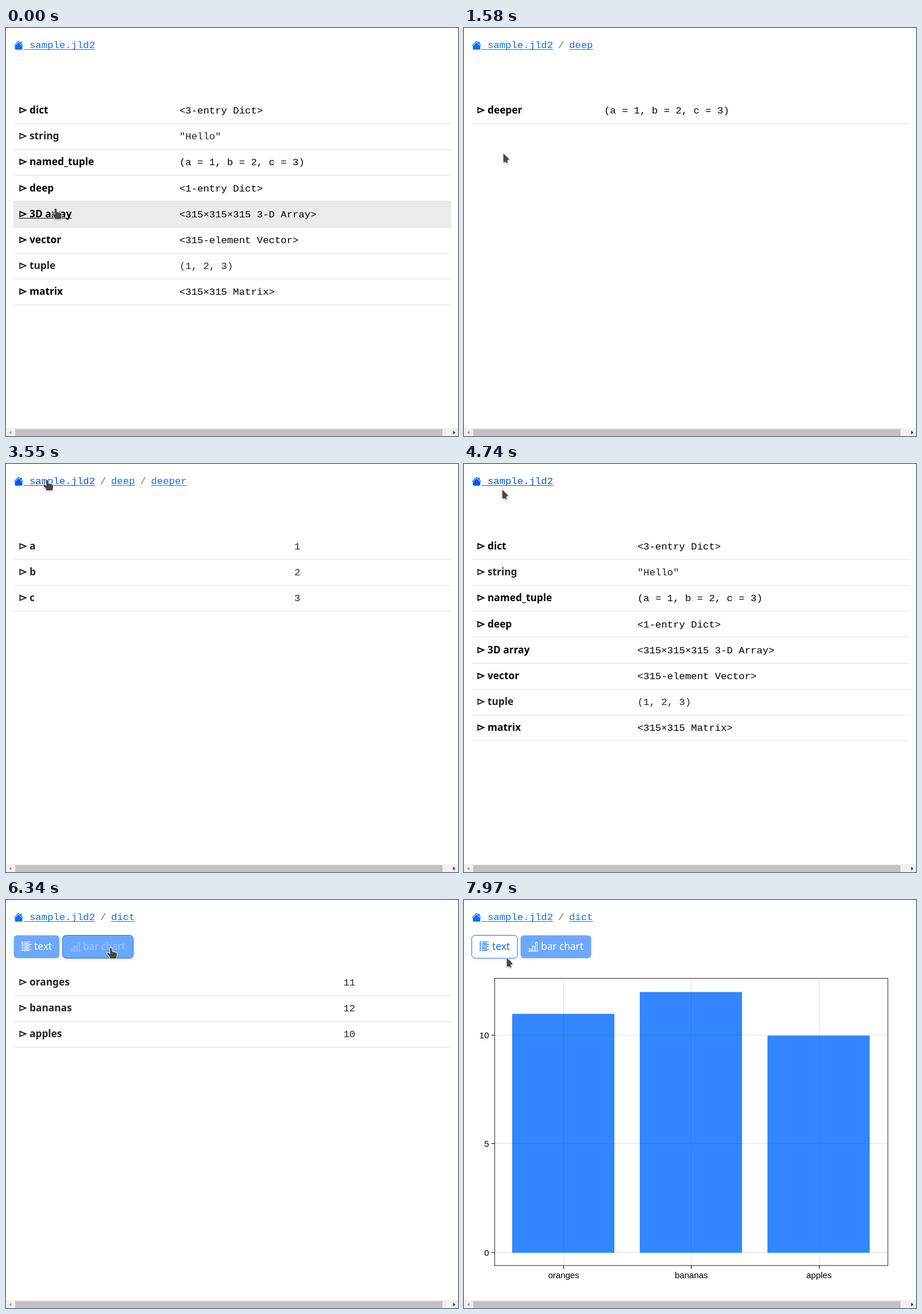
An HTML page with a canvas that plays this animation: 787x711 px, repeating every 8 s.

```html
<!DOCTYPE html>
<html lang="en">
<head>
<meta charset="utf-8">
<title>Data file browser</title>
<style>
html, body { margin: 0; width: 100%; height: 100%; overflow: hidden; background: #fff; }
canvas { display: block; }
</style>
</head>
<body>
<canvas id="stage" width="787" height="711"></canvas>
<script>
const ctx = document.getElementById('stage').getContext('2d');
const LOOP = 8000;
const MONO = '17.3px "Liberation Mono", monospace';
const BOLD = 'bold 17.3px "Noto Sans", sans-serif';
const SANS = '17.3px "Noto Sans", sans-serif';
const LABEL = '15px "Liberation Sans", Arial, sans-serif';
const BLUE = '#0d6efd', INK = '#212529';

// Rows are [name, value, opens a page]
const pages = {
  root: { path: [], column: 302, rows: [
    ['dict', '<3-entry Dict>', true], ['string', '"Hello"', false],
    ['named_tuple', '(a = 1, b = 2, c = 3)', true], ['deep', '<1-entry Dict>', true],
    ['3D array', '<315×315×315 3-D Array>', true], ['vector', '<315-element Vector>', true],
    ['tuple', '(1, 2, 3)', false], ['matrix', '<315×315 Matrix>', true]] },
  deep: { path: ['deep'], column: 244, rows: [['deeper', '(a = 1, b = 2, c = 3)', true]] },
  deeper: { path: ['deep', 'deeper'], column: 502, rows: [['a', '1'], ['b', '2'], ['c', '3']] },
  dict: { path: ['dict'], column: 587.5, rows: [['oranges', '11'], ['bananas', '12'], ['apples', '10']] },
};
const visits = [[0, 'root'], [1000, 'deep'], [2430, 'deeper'], [4070, 'root'], [5660, 'dict']];
const pageAt = t => pages[visits.filter(v => v[0] <= Math.max(0, t)).pop()[1]];
const CLICK_CHART = 6620, SHOW_CHART = 6700;

// Pointer path: time, x, y
const pointerKeys = [
  [0, 86, 314], [50, 86, 314], [780, 76, 275], [1380, 76, 275], [1580, 68, 218],
  [2160, 77, 145], [2820, 77, 145], [2910, 72, 168], [2980, 71, 172], [3200, 71, 110],
  [3550, 71, 27], [4530, 71, 27], [5260, 47, 130], [5320, 49, 134], [5380, 49, 134],
  [5510, 52, 135], [5800, 52, 135], [6340, 182, 83], [6450, 185, 79], [7100, 185, 79],
  [7430, 170, 348], [7720, 170, 348], [7970, 74, 100], [8000, 74, 100]];

function slope(i, axis) {
  const a = pointerKeys[i - 1], b = pointerKeys[i], c = pointerKeys[i + 1];
  if (!a || !c) return 0;
  const before = (b[axis] - a[axis]) / (b[0] - a[0]);
  const after = (c[axis] - b[axis]) / (c[0] - b[0]);
  return before * after > 0 ? 2 * before * after / (before + after) : 0;
}

function pointerAt(t) {
  t = Math.max(0, t);
  let i = 0;
  while (i < pointerKeys.length - 2 && pointerKeys[i + 1][0] <= t) i++;
  const a = pointerKeys[i], b = pointerKeys[i + 1], span = b[0] - a[0];
  const u = (t - a[0]) / span, v = 1 - u;
  const [x, y] = [1, 2].map(k =>
    v * v * (1 + 2 * u) * a[k] + u * u * (1 + 2 * v) * b[k] +
    span * u * v * (v * slope(i, k) - u * slope(i + 1, k)));
  return { x, y };
}

const clamp = u => Math.min(1, Math.max(0, u));
const ease = u => { u = clamp(u); return u * u * (3 - 2 * u); };
const mix = (a, b, u) => `rgb(${a.map((v, i) => Math.round(v + (b[i] - v) * u))})`;
const lineY = i => Math.floor(121 + 45.2 * i);
const baseline = i => Math.round(149 + 45.2 * i);

function rect(x, y, w, h, color) {
  ctx.fillStyle = color;
  ctx.fillRect(x, y, w, h);
}

function text(str, x, y, font, color, align = 'left') {
  ctx.font = font;
  ctx.fillStyle = color;
  ctx.textAlign = align;
  ctx.fillText(str, x, y);
  return ctx.measureText(str).width;
}

function polygon(points, color) {
  ctx.beginPath();
  points.forEach(p => ctx.lineTo(...p));
  ctx.closePath();
  ctx.fillStyle = color;
  ctx.fill();
}

function nameEnd(name) {
  ctx.font = BOLD;
  return 41 + ctx.measureText(name).width;
}

const overHome = p => p.x > 13 && p.x < 155 && p.y > 18 && p.y < 42;
const overChartButton = p => p.x > 98 && p.x < 222 && p.y > 61 && p.y < 102;
const overName = (p, row, i, reach) => row[2] && p.x > 22 && p.x < nameEnd(row[0]) &&
  Math.abs(p.y - baseline(i) + 6) <= reach;

const house = new Path2D('m8 3.3 6 6v4.2a1.5 1.5 0 0 1-1.5 1.5h-9A1.5 1.5 0 0 1 2 13.5V9.3z' +
  'M8.7 1.5a1 1 0 0 0-1.4 0L.65 8.15a.5.5 0 0 0 .7.7L8 2.2l6.65 6.65a.5.5 0 0 0 .7-.7L13 5.8V2.5' +
  'a.5.5 0 0 0-.5-.5h-1a.5.5 0 0 0-.5.5v1.3z');
const listIcon = new Path2D([0, 1, 2, 3, 4, 5, 6, 7].map(i =>
  `M0 ${i * 2 + .5}H3M4 ${i * 2 + .5}H${[15, 12, 16, 13][i % 4]}`).join(''));
const barsIcon = new Path2D('M1.5 15.5V11.5H4.5V15.5M6.5 15.5V7.5H9.5V15.5M11.5 15.5V1.5H14.5V15.5M0 15.5H16');
const arrow = new Path2D('M0 0L10.5 10.5L6.8 12.5L8 18L4.5 15.5H0Z');
const hand = new Path2D('M-2 1Q0-1 1.5 1L2.3 6.5L9 8Q11 9 10.5 12L9.5 18.5H-1L-2.5 15L-6.5 10.5Q-7 7.5-4.5 8.5L-1.2 10.5Z');

function scaled(x, y, draw) {
  ctx.save();
  ctx.translate(x, y);
  ctx.scale(1.08, 1.08);
  draw();
  ctx.restore();
}

function drawBreadcrumb(path, hovered) {
  const home = hovered ? '#0056f8' : BLUE;
  scaled(13.3, 21.5, () => { ctx.fillStyle = home; ctx.fill(house); });
  const width = text(' sample.jld2', 30.6, 35, MONO, home);
  rect(30.6, 37, width, 1, home);
  let x = 164;
  for (const part of path) {
    text('/', x, 35, MONO, '#6c757d');
    const w = text(part, x + 19, 35, MONO, BLUE);
    rect(x + 19, 37, w, 1, BLUE);
    x += w + 28;
  }
}

function drawTable(page, p) {
  page.rows.forEach((row, i) => {
    const [name, value, opens] = row;
    const top = lineY(i) + (i ? 1 : 0), bottom = lineY(i + 1), base = baseline(i);
    const color = opens ? '#000' : INK;
    if (p.y >= top && p.y < bottom && p.x > 13 && p.x < 775) rect(13, top, 762, bottom - top, '#ebebeb');
    rect(13, bottom, 762, 1, '#dee0e2');
    ctx.beginPath();
    ctx.moveTo(24.3, base - 10);
    ctx.lineTo(34.5, base - 5.7);
    ctx.lineTo(24.3, base - 1.4);
    ctx.closePath();
    ctx.lineWidth = 1.9;
    ctx.strokeStyle = color;
    ctx.stroke();
    const width = text(name, 41, base, BOLD, color);
    if (overName(p, row, i, 12)) rect(22, base + 1, 19 + width, 1, color);
    text(value, page.column, base, MONO, color);
  });
}

function drawButton(x, w, label, icon, filled, disabled) {
  const blue = [13, 110, 253], white = [255, 255, 255];
  const ink = mix(blue, white, filled);
  ctx.globalAlpha = disabled ? .6 : 1;
  ctx.beginPath();
  ctx.roundRect(x + .5, 61.5, w - 1, 40, 6);
  ctx.fillStyle = mix(white, blue, filled);
  ctx.fill();
  ctx.lineWidth = 1;
  if (!disabled) {
    ctx.strokeStyle = BLUE;
    ctx.stroke();
  }
  ctx.globalAlpha = 1;
  scaled(x + 14, 72.5, () => { ctx.strokeStyle = ink; ctx.stroke(icon); });
  text(label, x + 36, 87, SANS, ink);
}

function drawChart() {
  const labels = ['oranges', 'bananas', 'apples'], values = [11, 12, 10];
  const centerX = i => 173 + 222.3 * i;
  const valueY = v => 614.5 - 37.95 * v;
  const ticks = [0, 5, 10];
  labels.forEach((_, i) => rect(Math.round(centerX(i)), 136, 1, 501, '#dfdfdf'));
  ticks.forEach(v => rect(54, Math.floor(valueY(v)), 684, 1, '#dfdfdf'));
  values.forEach((v, i) => {
    const left = centerX(i) - 89.2, top = valueY(v) + 1.3;
    rect(left, top, 178, 615 - top, '#3386ff');
    rect(Math.round(centerX(i)), top, 1, 614 - top, i < 2 ? '#297de6' : '#1298c0');
    ticks.forEach(tick => {
      const y = Math.floor(valueY(tick));
      if (y > top) rect(left, y, 178, 1, tick ? '#0c9fb0' : '#35b3d6');
    });
    rect(Math.round(centerX(i)), 637, 1, 6, '#000');
    text(labels[i], centerX(i) + .5, 659, LABEL, '#000', 'center');
  });
  ticks.forEach(v => {
    rect(47.5, Math.floor(valueY(v)), 6, 1, '#000');
    text(v, 43.5, valueY(v) + 5.5, LABEL, '#000', 'right');
  });
  ctx.lineWidth = 1;
  ctx.strokeStyle = '#222';
  ctx.strokeRect(53.5, 136.5, 684.5, 500.5);
}

function drawScrollbar() {
  rect(0, 697, 787, 14, '#f1f1f1');
  rect(16, 699, 744, 12, '#c1c1c1');
  polygon([[5.5, 705], [9.5, 701.5], [9.5, 708.5]], '#a3a3a3');
  polygon([[782.5, 705], [778.5, 701.5], [778.5, 708.5]], '#404040');
}

function drawPointer(p, shape) {
  ctx.save();
  ctx.translate(p.x + .5, p.y + .5);
  ctx.lineJoin = 'round';
  ctx.lineWidth = 2;
  ctx.strokeStyle = '#fff';
  ctx.shadowColor = 'rgba(0,0,0,.3)';
  ctx.shadowBlur = 2;
  ctx.shadowOffsetY = 1;
  ctx.stroke(shape);
  ctx.shadowColor = 'transparent';
  ctx.fillStyle = '#484848';
  ctx.fill(shape);
  ctx.restore();
}

function render(t) {
  const page = pageAt(t), pointer = pointerAt(t);
  const hover = pointerAt(t - 40);   // page highlights trail the pointer slightly
  rect(0, 0, 787, 711, '#fff');
  drawBreadcrumb(page.path, overHome(hover));
  if (page === pages.dict) {
    const clicked = t >= CLICK_CHART;
    drawButton(13, 80.5, 'text', listIcon, 1 - ease((t - CLICK_CHART) / 150), !clicked);
    drawButton(98, 124, 'bar chart', barsIcon, ease((t - 6255) / 150), clicked);
  }
  if (t >= SHOW_CHART) drawChart();
  else drawTable(page, hover);
  drawScrollbar();

  // The pointer shape is refreshed shortly after a page change.
  const earlier = pageAt(t - 90);
  const pointing = overHome(pointer) ||
    (t < SHOW_CHART && earlier.rows.some((row, i) => overName(pointer, row, i, 14))) ||
    (earlier === pages.dict && t < CLICK_CHART + 90 && overChartButton(pointer));
  drawPointer(pointer, pointing ? hand : arrow);
}

const start = performance.now();
function frame() {
  render((performance.now() - start) % LOOP);
  requestAnimationFrame(frame);
}
frame();
</script>
</body>
</html>
```
